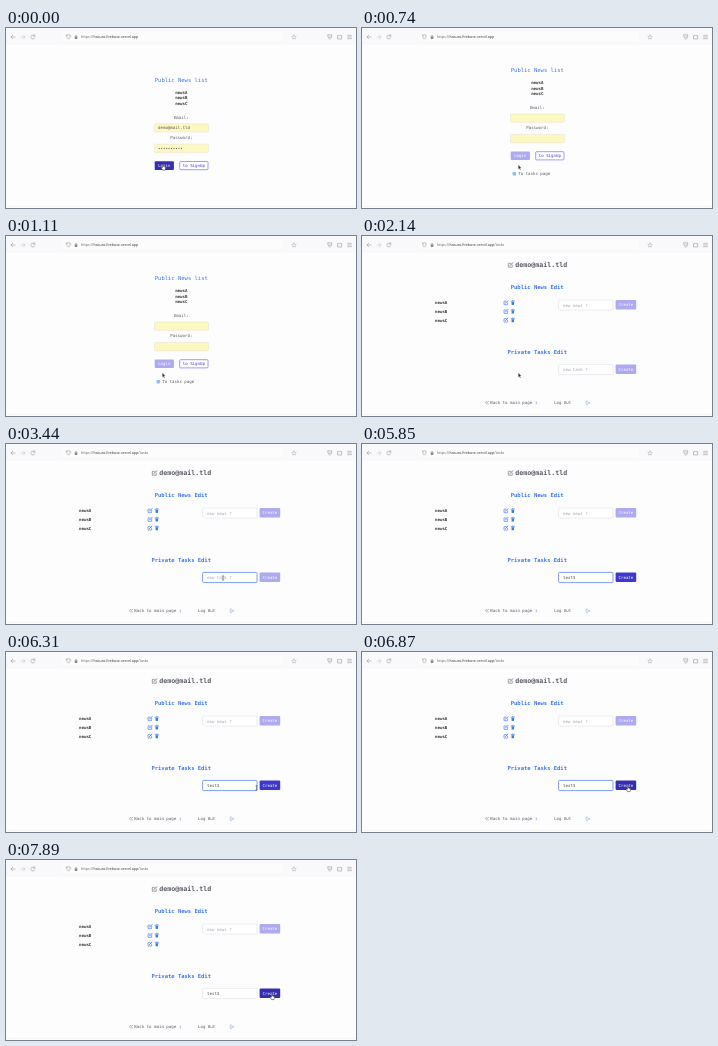
An HTML page for the animation above (7990 ms loop, 350 by 180 pixels).

```html
<!DOCTYPE html>
<html lang="en">
<head>
<meta charset="utf-8">
<title>News and tasks</title>
<style>
html, body { margin: 0; width: 100%; height: 100%; overflow: hidden; background: #fdfdfe; }
svg { display: block; width: 100%; height: 100%; }
text { font: 4.1px "DejaVu Sans Mono", monospace; fill: #555a64; white-space: pre; }
.b { font-weight: bold; fill: #333; }
.h { font-size: 5.5px; fill: #3b78f0; }
.m { text-anchor: middle; }
.url { font: 3.65px "Open Sans", sans-serif; fill: #666; }
.line { fill: none; stroke-linecap: round; stroke-linejoin: round; }
</style>
</head>
<body>
<svg id="stage" viewBox="0 0 350 180"></svg>
<script>
const LOOP = 7990;
const MAIL = 'demo@mail.tld';
const INDIGO = '#4038cc', DEEP = '#352eb0', PALE = '#aeaaf1', BLUE = '#3b78f0';
const stage = document.getElementById('stage');

const text = (x, y, s, cls = '', css = '') =>
  `<text x="${x}" y="${y}" class="${cls}" style="${css}">${s}</text>`;
const rect = (x, y, w, h, fill, stroke = 'none', sw = 0.5, r = 1) =>
  `<rect x="${x}" y="${y}" width="${w}" height="${h}" rx="${r}" fill="${fill}" stroke="${stroke}" stroke-width="${sw}"/>`;
const line = (d, color = '#888', w = 0.5) =>
  `<path class="line" d="${d}" stroke="${color}" stroke-width="${w}"/>`;
const at = (x, y, s) => `<g transform="translate(${x} ${y})">${s}</g>`;
const button = (x, y, w, h, s, fill, color = '#fff', stroke = 'none') =>
  rect(x, y, w, h, fill, stroke, 0.7) +
  text(x + w / 2, y + h / 2 + 1.5, s, 'm', `fill:${color}`);

const pencil = (x, y, c, k = 1) => at(x, y, `<g transform="scale(${k})">` +
  line('M0 -1.5H-2V2H1.6V0', c, 0.6) + line('M-.5 .5L2 -2', c, 0.9) + '</g>');
const trash = (x, y) => at(x, y,
  line('M-1.8 -1.4H1.8M-.6 -2.1H.6', BLUE, 0.6) +
  `<path d="M-1.4 -.8H1.4L1.1 2.2H-1.1Z" fill="${BLUE}"/>`);

const pointers = {
  arrow: '<path d="M-1 -2.5V2L0 1.1L.8 2.8L1.5 2.5L.8 .8H2Z" fill="#222" stroke="#fff" stroke-width=".3"/>',
  hand: '<path d="M-.9 -3Q0 -3.5 .2 -2.6V-.8L2 -.3Q2.5 0 2.3 1L1.7 2.8H-.7L-2.3 .5Q-2 -.4 -.9 .4Z" fill="#fff" stroke="#222" stroke-width=".5"/>',
  beam: line('M-.8 -2H.8M0 -2V2M-.8 2H.8', '#444', 0.5)
};

function browser(path) {
  return rect(0, 0, 350, 15.6, '#f9f9fb', 'none', 0, 0) +
    line('M0 15.8H350', '#ececf0', 0.4) +
    rect(56, 4, 221, 9.5, '#fcfcfd', 'none', 0, 1.5) +
    line('M9 9H5M6.7 7.2L5 9L6.7 10.8') +
    line('M15 9H19M17.3 7.2L19 9L17.3 10.8', '#bbb') +
    line('M28.6 8A2 2 0 1 0 28.7 9.8M28.8 6.8V8.2H27.3') +
    line('M60.7 7.2L62.5 6.7L64.3 7.2Q64.3 10.2 62.5 11.2Q60.7 10.2 60.7 7.2Z') +
    rect(68.7, 8.6, 2.7, 2.3, '#888', 'none', 0, 0.3) +
    line('M69.2 8.6V7.8Q70 6.5 70.9 7.8V8.6') +
    text(75, 10.2, 'https://<tspan fill="#333">hasura-firebase.vercel.app</tspan>' + path, 'url') +
    line('M288 6.8L288.7 8.3L290.2 8.5L289.1 9.6L289.4 11.1L288 10.4L286.6 11.1L286.9 9.6L285.8 8.5L287.3 8.3Z', '#999', 0.4) +
    line('M322 6.8H325.6V8.8Q325.4 10.6 323.8 11.2Q322.2 10.6 322 8.8ZM322.9 8.6L323.8 9.4L324.8 8.6') +
    line('M332 7.6H333.2Q333.8 6.2 334.4 7.6H335.6V11H332Z') +
    line('M341.6 7.3H345.4M341.6 9H345.4M341.6 10.7H345.4');
}

function loginPage(t) {
  const sent = t >= 90, linked = t >= 370;
  const field = (y, s) => rect(148.5, y, 54, 8.4, '#fdf8c2', '#dedbc4', 0.4) +
    text(152, y + 5.7, sent ? '' : s);
  const body =
    text(175.3, 54, 'Public News list', 'h m') +
    ['newsA', 'newsB', 'newsC'].map((s, i) => text(175.3, 66 + i * 5.4, s, 'b m')).join('') +
    text(175.3, 90.8, 'Email:', 'm') + field(95.7, MAIL) +
    text(175.3, 111, 'Password:', 'm') + field(116.2, '••••••••••') +
    button(148.7, 133.3, 19.2, 8.6, 'Login', sent ? PALE : DEEP) +
    button(173.7, 133.5, 28.3, 8.2, 'to SignUp', '#fff', INDIGO, '#7a74e4');
  const link = linked
    ? rect(150.5, 144.1, 3.6, 3.4, '#8ebcf5') + text(156.2, 147.4, 'To tasks page') : '';
  return browser('') + at(0, linked ? -9.8 : 0, body) + link;
}

const entry = (y, s, focus, hint) =>
  rect(196.6, y, 54.4, 10.2, '#fff', focus ? '#7296ea' : '#d6d8de', focus ? 0.9 : 0.5) +
  text(201, y + 6.7, s, '', `fill:${hint ? '#999ea8' : '#444'}`);

function tasksPage(t) {
  const keys = [4550, 4640, 4730, 4920, 5570];
  const typed = 'test3'.slice(0, keys.filter(k => t >= k).length);
  const focus = t >= 3000 && t < 7200;
  const rows = ['newsA', 'newsB', 'newsC'].map((s, i) => {
    const y = 66.7 + i * 8.7;
    return text(73, y + 1.5, s, 'b') + pencil(144, y, BLUE) + trash(150.8, y);
  }).join('');
  const fill = !typed ? PALE : pointer(t).x > 254 ? DEEP : INDIGO;
  return browser('/tasks') +
    pencil(148.5, 29, '#777', 1.1) +
    text(153.2, 31.2, MAIL, 'b', 'font-size:6.65px;fill:#5b5e68') +
    text(175.2, 53, 'Public News Edit', 'h m b', `fill:${BLUE}`) + rows +
    entry(64, 'new news ?', false, true) +
    button(253.6, 63.9, 20.6, 9.6, 'Create', PALE) +
    text(175.2, 117.8, 'Private Tasks Edit', 'h m b', `fill:${BLUE}`) +
    entry(128.4, typed || 'new task ?', focus, !typed) +
    button(253.6, 128.4, 20.6, 9.6, 'Create', fill) +
    line('M124.8 165.2L123.4 166.7L124.8 168.2M126.6 165.2L125.2 166.7L126.6 168.2', '#666') +
    text(128.3, 168.2, 'Back to main page') +
    rect(173.8, 165.2, 0.9, 3.2, '#9db2f4', 'none', 0, 0.3) +
    text(192, 168.2, 'Log Out') +
    line('M225.6 165H224.2V168.4H225.6M225.6 166.8H227.6M226.8 165.9L227.6 166.8L226.8 167.7', '#7f9df0');
}

// Eased progress between two times
function ease(t, from, to) {
  const p = Math.min(1, Math.max(0, (t - from) / (to - from)));
  return p * p * (3 - 2 * p);
}

function pointer(t) {
  const a = ease(t, 2320, 2790), b = ease(t, 5850, 6590);
  const x = 157.3 + 59.7 * a + 49.3 * b;
  const y = 139.3 - 5.3 * a + 2.8 * b;
  const inside = x > 196 && x < 252;
  const kind = t < 90 || x > 254 ? 'hand' : inside ? 'beam' : 'arrow';
  return { x, y, kind, hidden: t >= 4550 && t < 5860 };
}

function draw(now) {
  const t = now % LOOP, p = pointer(t);
  stage.innerHTML = (t < 1300 ? loginPage(t) : tasksPage(t)) +
    line('M0 178.4H350', '#ececf0', 0.5) +
    (p.hidden ? '' : at(p.x, p.y, pointers[p.kind]));
}

const start = performance.now();
function tick() {
  draw(performance.now() - start);
  requestAnimationFrame(tick);
}
tick();
</script>
</body>
</html>
```
